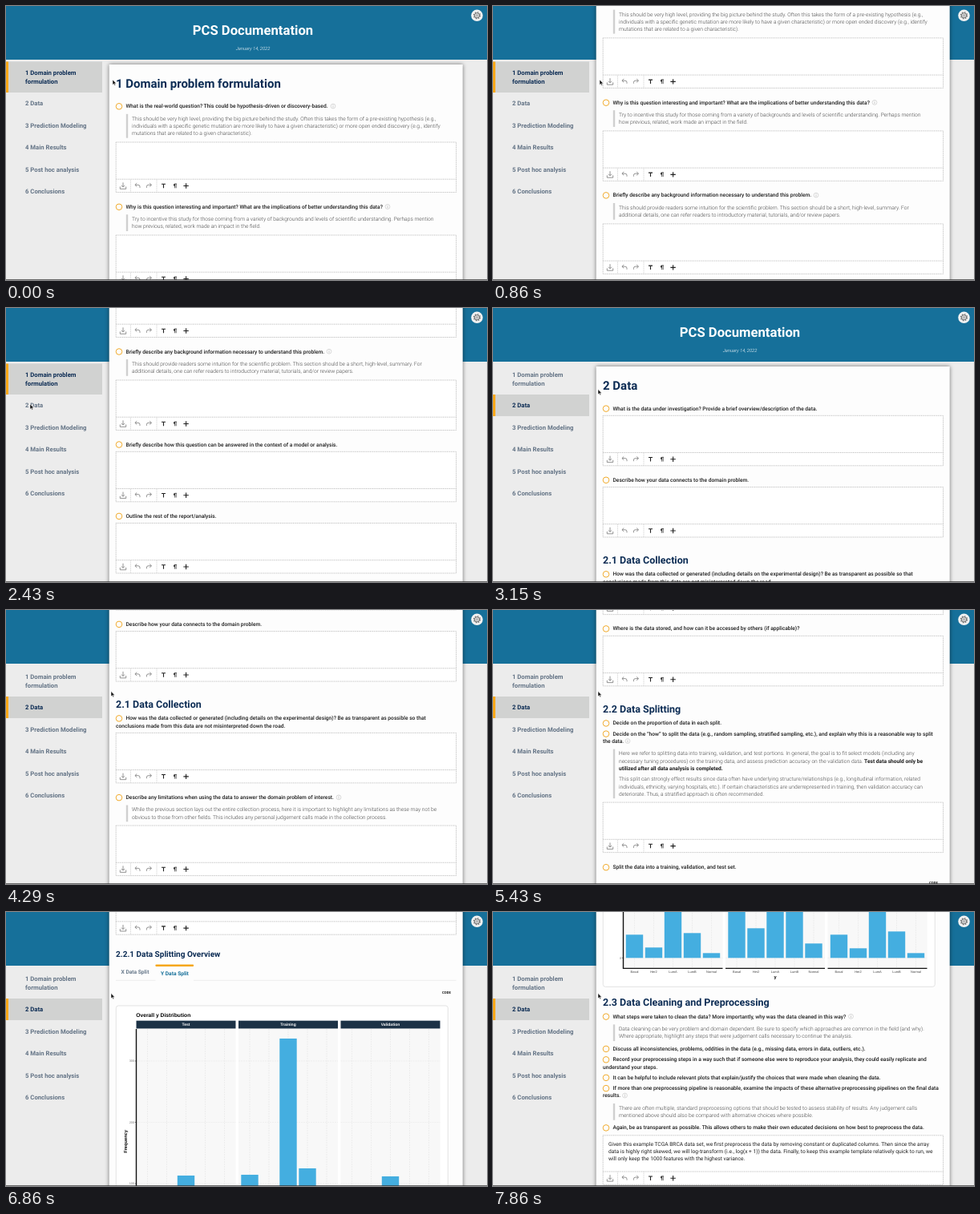
Animation, 600 px wide and 342 px high, one loop 8 s. Source, as an HTML page:

```html
<!DOCTYPE html>
<html lang="en">
<head>
<meta charset="utf-8">
<title>PCS Documentation</title>
<style>
html, body { margin: 0; width: 100%; height: 100%; overflow: hidden; background: #ececec; }
svg { display: block; width: 600px; height: 342px; font-family: Roboto, sans-serif; font-size: 6.667px; text-rendering: geometricPrecision; }
.head { font-weight: 700; fill: #0c2c54; }
.ask { font-weight: 500; fill: #1d1d1d; }
.hint { font-weight: 300; fill: #444; }
.hint tspan { font-weight: 700; fill: #1d1d1d; }
.note { fill: #222; }
.nav { font-weight: 700; }
.plot { font-family: "Liberation Sans", Arial, sans-serif; }
.panel { filter: drop-shadow(0 0 2.5px rgba(0, 0, 0, .55)); }
</style>
</head>
<body>
<svg id="stage" viewBox="0 0 600 342">
  <defs>
    <g id="tools" fill="none" stroke="#777" stroke-width=".8">
      <path d="M146-4.2V1.4M144-.6l2 2 2-2M142.3 1v2.8h7.4V1"/>
      <path d="M161.2-1.2h3.6a2.2 2.2 0 0 1 2.2 2.2v1.4M163.2-3.4l-2.3 2.2 2.3 2.2"/>
      <path d="M181.2-1.2h-3.6a2.2 2.2 0 0 0-2.2 2.2v1.4M179.2-3.4l2.3 2.2-2.3 2.2"/>
      <path d="M194-2.3h5M196.5-2.3v5M221.4 0h6.4M224.6-3.2v6.4" stroke="#222" stroke-width="1.1"/>
      <path d="M213-2.5h-2.6M210.6-2.5v5.3M212.2-2.5v5.3" stroke="#222" stroke-width=".7"/>
      <path d="M210.6-2.8a1.6 1.6 0 0 0 0 3.2z" fill="#222" stroke="none"/>
      <path d="M155.5-8V8M188-8V8" stroke="#c4c4c4" stroke-width=".7" stroke-dasharray="1 .7"/>
    </g>
  </defs>
  <rect width="600" height="342" fill="#ececec"/>
  <rect width="600" height="67" fill="#16709a"/>
  <text x="308" y="35.8" text-anchor="middle" font-size="16.667" font-weight="700" fill="#fff">PCS Documentation</text>
  <text x="308" y="54.7" text-anchor="middle" font-size="5.833" font-weight="300" font-style="italic" fill="#fff">January 14, 2022</text>
  <g id="nav"></g>
  <g id="sheet">
    <rect class="panel" x="128.7" y="73" width="441" height="2200" fill="#fdfdfd"/>
    <g id="domain"></g>
    <g id="data"></g>
  </g>
  <rect y="341.3" width="600" height=".7" fill="#333"/>
  <circle cx="587.5" cy="11.8" r="7.3" fill="#f1f1f1"/>
  <g fill="none" stroke="#666">
    <circle cx="587.5" cy="11.8" r="3.1" stroke-width="1"/>
    <circle cx="587.5" cy="11.8" r="4" stroke-width="1.1" stroke-dasharray="1.57 1.57"/>
    <circle cx="587.5" cy="11.8" r="1.2" stroke-width=".7"/>
  </g>
  <path id="cursor" d="M0 0V6.4L1.5 5.1 2.5 7.3 3.6 6.8 2.6 4.7H4.6z" fill="#111" stroke="#fff" stroke-width=".5"/>
</svg>
<script>
const $ = id => document.getElementById(id);
const LOOP = 8000, STEP = LOOP / 56, SWITCH = 2700;

// y is the vertical middle of the capitals
const text = (x, y, str, cls, size = 6.667, extra = '') =>
  `<text x="${x}" y="${y + size * .355}" class="${cls}" font-size="${size}" ${extra}>${str}</text>`;
const rect = (x, y, w, h, fill, extra = '') =>
  `<rect x="${x}" y="${y}" width="${w}" height="${h}" fill="${fill}" ${extra}/>`;
const group = (dy, ...parts) => `<g transform="translate(0 ${dy})">${parts.join('')}</g>`;
const head = (y, str, size) => text(137, y - size * .05, str, 'head', size);

const info = (x, y) => `<circle cx="${x}" cy="${y}" r="2.9" fill="none" stroke="#c2c2c2" stroke-width=".6"/>` +
  `<path d="M${x} ${y - .5}v2.1M${x} ${y - 1.7}v.7" stroke="#b0b0b0" stroke-width=".7"/>`;

const ask = (y, line, rest = '', infoX = 0) =>
  `<circle cx="141" cy="${y + .3}" r="3.8" fill="none" stroke="#f2ab2c" stroke-width="1"/>` +
  text(149.5, y, line, 'ask') + (rest && text(137, y + 9.2, rest, 'ask')) +
  (infoX ? info(infoX, y + (rest ? 9.2 : 0)) : '');

const hint = (y, lines, bar = true) => (bar ? rect(149.8, y - 5.5, 2.4, lines.length * 9.2 + 2.3, '#cfcfcf') : '') +
  lines.map((line, i) => text(157, y + i * 9.2, line, 'hint')).join('');

const editor = (y, h = 62.5) =>
  `<g fill="none" stroke="#b9b9b9" stroke-width=".8" stroke-dasharray="1 .6"><rect x="137.2" y="${y}" width="424.4" height="${h}" fill="#fff"/>` +
  `<path d="M137 ${y + h - 16.3}H561.6"/></g><use href="#tools" y="${y + h - 8}"/>`;

const code = y => text(555, y, 'CODE', 'ask', 4.3, 'text-anchor="end" style="font-weight:700"');

const domain = [
  head(97, '1 Domain problem formulation', 15),
  ask(125, 'What is the real-world question? This could be hypothesis-driven or discovery-based.', '', 408),
  hint(140.3, [
    'This should be very high level, providing the big picture behind the study. Often this takes the form of a pre-existing hypothesis (e.g.,',
    'individuals with a specific genetic mutation are more likely to have a given characteristic) or more open ended discovery (e.g., identify',
    'mutations that are related to a given characteristic).']),
  editor(170),
  ask(250.5, 'Why is this question interesting and important? What are the implications of better understanding this data?', '', 476),
  hint(265.8, [
    'Try to incentive this study for those coming from a variety of backgrounds and levels of scientific understanding. Perhaps mention',
    'how previous, related, work made an impact in the field.']),
  editor(286),
  ask(366.2, 'Briefly describe any background information necessary to understand this problem.', '', 403),
  hint(381.6, [
    'This should provide readers some intuition for the scientific problem. This section should be a short, high-level, summary. For',
    'additional details, one can refer readers to introductory material, tutorials, and/or review papers.']),
  editor(402),
  ask(482.2, 'Briefly describe how this question can be answered in the context of a model or analysis.'),
  editor(491.3),
  ask(571.6, 'Outline the rest of the report/analysis.'),
  editor(580.5)
].join('');

function chart() {
  const facets = [
    ['Test', 162.5, [29, 13, 86.5, 31, 6]],
    ['Training', 290, [87.5, 37, 257.5, 95.5, 18]],
    ['Validation', 417.5, [29, 12, 85.5, 33, 6]]
  ];
  const kinds = ['Basal', 'Her2', 'LumA', 'LumB', 'Normal'];
  const zero = 415.5, top = 146, bottom = 428.5, w = 124;
  const mid = 'text-anchor="middle"', grid = 'stroke="#e2e2e2" stroke-width=".5" stroke-dasharray="2 1"';
  let out = rect(137.3, 117, 414, 334.5, '#fff', 'rx="3" stroke="#dcdcdc" stroke-width=".8"') +
    text(162.3, 128.6, 'Overall y Distribution', 'plot', 6.72, 'font-weight="700"');
  for (const [name, x, heights] of facets) {
    out += rect(x, top, w, bottom - top, '#f8f8f8') + rect(x, 135.7, w, 9.8, '#1c3246') +
      text(x + w / 2, 140.6, name, 'plot', 5, mid + ' font-weight="700" fill="#fff"');
    for (let n = 0; n < 4; n++) out += `<path d="M${x} ${zero - n * 76.5}h${w}" ${grid}/>`;
    kinds.forEach((kind, i) => {
      const cx = x + 14 + i * 24;
      out += `<path d="M${cx} ${top}V${bottom}" ${grid}/>` +
        rect(cx - 10.7, zero - heights[i], 21.4, heights[i], '#44aee0') +
        text(cx, 432.6, kind, 'plot', 4, mid + ' fill="#444"');
    });
    out += `<path d="M${x} ${bottom}h${w}" stroke="#111" stroke-width="1.3"/>`;
  }
  for (let n = 0; n < 4; n++) {
    out += text(160, zero - n * 76.5, n * 100, 'plot', 3.8, 'text-anchor="end" fill="#777"') +
      `<path d="M160.7 ${zero - n * 76.5}h1.6" stroke="#333" stroke-width=".6"/>`;
  }
  return out + `<path d="M162.5 ${top}V${bottom + .6}" stroke="#111" stroke-width="1.4"/>` +
    text(352, 439.2, 'y', 'plot', 5.7, mid + ' font-weight="700"') +
    `<text class="plot" transform="translate(151.2 286.5) rotate(-90)" ${mid} font-size="5.7" font-weight="700">Frequency</text>`;
}

const data = [
  head(97, '2 Data', 15),
  ask(125.3, 'What is the data under investigation? Provide a brief overview/description of the data.'),
  editor(134.3),
  ask(214.5, 'Describe how your data connects to the domain problem.'),
  editor(223.5),
  head(315, '2.1 Data Collection', 12.5),
  ask(332, 'How was the data collected or generated (including details on the experimental design)? Be as transparent as possible so that',
    'conclusions made from this data are not misinterpreted down the road.'),
  editor(350.3),
  ask(430.8, 'Describe any limitations when using the data to answer the domain problem of interest.', '', 415),
  hint(446, [
    'While the previous section lays out the entire collection process, here it is important to highlight any limitations as these may not be',
    'obvious to those from other fields. This includes any personal judgement calls made in the collection process.']),
  editor(466),
  group(523,
    ask(23, 'Where is the data stored, and how can it be accessed by others (if applicable)?'),
    editor(32.2),
    head(124, '2.2 Data Splitting', 12.5),
    ask(141, 'Decide on the proportion of data in each split.'),
    ask(154.2, 'Decide on the “how” to split the data (e.g., random sampling, stratified sampling, etc.), and explain why this is a reasonable way to split',
      'the data.', 168),
    rect(149.8, 173.5, 2.4, 61.5, '#cfcfcf'),
    hint(179, [
      'Here we refer to splitting data into training, validation, and test portions. In general, the goal is to fit select models (including any',
      'necessary tuning procedures) on the training data, and assess prediction accuracy on the validation data. <tspan>Test data should only be</tspan>',
      '<tspan>utilized after all data analysis is completed.</tspan>'], false),
    hint(211, [
      'This split can strongly effect results since data often have underlying structure/relationships (e.g., longitudinal information, related',
      'individuals, ethnicity, varying hospitals, etc.). If certain characteristics are underrepresented in training, then validation accuracy can',
      'deteriorate. Thus, a stratified approach is often recommended.'], false),
    editor(240),
    ask(320.8, 'Split the data into a training, validation, and test set.'),
    code(340.5)),
  group(911,
    editor(-34.3),
    head(53.3, '2.2.1 Data Splitting Overview', 10),
    '<path d="M137 85.3H561.5" stroke="#e6e6e6" stroke-width=".7"/>',
    rect(186.5, 66.5, 47.5, 19.5, '#fdfdfd'),
    rect(186.5, 65.6, 47.5, 2.4, '#f5a71c', 'rx=".8"'),
    text(143.5, 74.8, 'X Data Split', 'tab', 6.667, 'font-weight="700" fill="#66788a"'),
    text(193, 76.3, 'Y Data Split', 'tab', 6.667, 'font-weight="700" fill="#16709a"'),
    code(101),
    chart()),
  group(1269.5,
    head(113, '2.3 Data Cleaning and Preprocessing', 12.5),
    ask(130, 'What steps were taken to clean the data? More importantly, why was the data cleaned in this way?', '', 446.5),
    hint(145.6, [
      'Data cleaning can be very problem and domain dependent. Be sure to specify which approaches are common in the field (and why).',
      'Where appropriate, highlight any steps that were judgement calls necessary to continue the analysis.']),
    ask(170.3, 'Discuss all inconsistencies, problems, oddities in the data (e.g., missing data, errors in data, outliers, etc.).'),
    ask(183.7, 'Record your preprocessing steps in a way such that if someone else were to reproduce your analysis, they could easily replicate and',
      'understand your steps.'),
    ask(206.2, 'It can be helpful to include relevant plots that explain/justify the choices that were made when cleaning the data.'),
    ask(219.5, 'If more than one preprocessing pipeline is reasonable, examine the impacts of these alternative preprocessing pipelines on the final data',
      'results.', 164.5),
    hint(244.2, [
      'There are often multiple, standard preprocessing options that should be tested to assess stability of results. Any judgement calls',
      'mentioned above should also be compared with alternative choices where possible.']),
    ask(268.8, 'Again, be as transparent as possible. This allows others to make their own educated decisions on how best to preprocess the data.'),
    editor(278.5, 61.5),
    text(144, 289, 'Given this example TCGA BRCA data set, we first preprocess the data by removing constant or duplicated columns. Then since the array', 'note'),
    text(144, 298.3, 'data is highly right skewed, we will log-transform (i.e., log(x + 1)) the data. Finally, to keep this example template relatively quick to run, we', 'note'),
    text(144, 307.6, 'will only keep the 1000 features with the highest variance.', 'note'))
].join('');

function nav(active) {
  const items = [['1 Domain problem', 83], ['2 Data', 121.3], ['3 Prediction Modeling', 148.8],
    ['4 Main Results', 176.4], ['5 Post hoc analysis', 204], ['6 Conclusions', 231.5]];
  const [y, h] = active ? [108, 27] : [69.5, 38.5];
  const fill = i => `fill="${i === active ? '#0c2c54' : '#647486'}"`;
  return rect(0, y, 120, h, '#d1d2d1') + rect(0, y, 3, h, '#f9a91a') +
    items.map(([str, cy], i) => text(24, cy, str, 'nav', 7.73, fill(i))).join('') +
    text(24, 93.9, 'formulation', 'nav', 7.73, fill(0));
}

const smooth = u => { u = Math.min(1, Math.max(0, u)); return u * u * (3 - 2 * u); };

// time, offset, speed
const knots = [[3150, 0, 0], [4286, 197, .23], [5429, 523, .28], [6857, 911, .31], [7858, 1269.5, .36]];

function scrollAt(t) {
  if (t < SWITCH) return 312 * smooth((t - 286) / 1285);
  if (t <= knots[0][0]) return 0;
  const i = knots.findIndex(k => k[0] >= t);
  const [t0, a, va] = knots[i - 1], [t1, b, vb] = knots[i];
  const d = t1 - t0, u = (t - t0) / d;
  return a + (b - a) * smooth(u) + d * (va * u * (1 - u) ** 2 - vb * u * u * (1 - u));
}

function cursorAt(t) {
  const go = smooth((t - 1571) / 860), back = smooth((t - 2700) / 440);
  return t < SWITCH ? [133 - 103 * go, 92 + 28 * go] : [30 + 101 * back, 120 - 18.5 * back];
}

$('domain').innerHTML = domain;
$('data').innerHTML = data;
let page = -1;

function draw(time) {
  const t = Math.floor((time % LOOP + 5) / STEP) % 56 * STEP;
  const next = t >= SWITCH ? 1 : 0;
  if (next !== page) {
    page = next;
    $('nav').innerHTML = nav(page);
    $('domain').style.display = page ? 'none' : '';
    $('data').style.display = page ? '' : 'none';
  }
  $('sheet').setAttribute('transform', `translate(0 ${-scrollAt(t).toFixed(2)})`);
  $('cursor').setAttribute('transform', `translate(${cursorAt(t)})`);
}

const start = performance.now();
function tick() {
  draw(performance.now() - start);
  requestAnimationFrame(tick);
}
tick();
</script>
</body>
</html>
```
